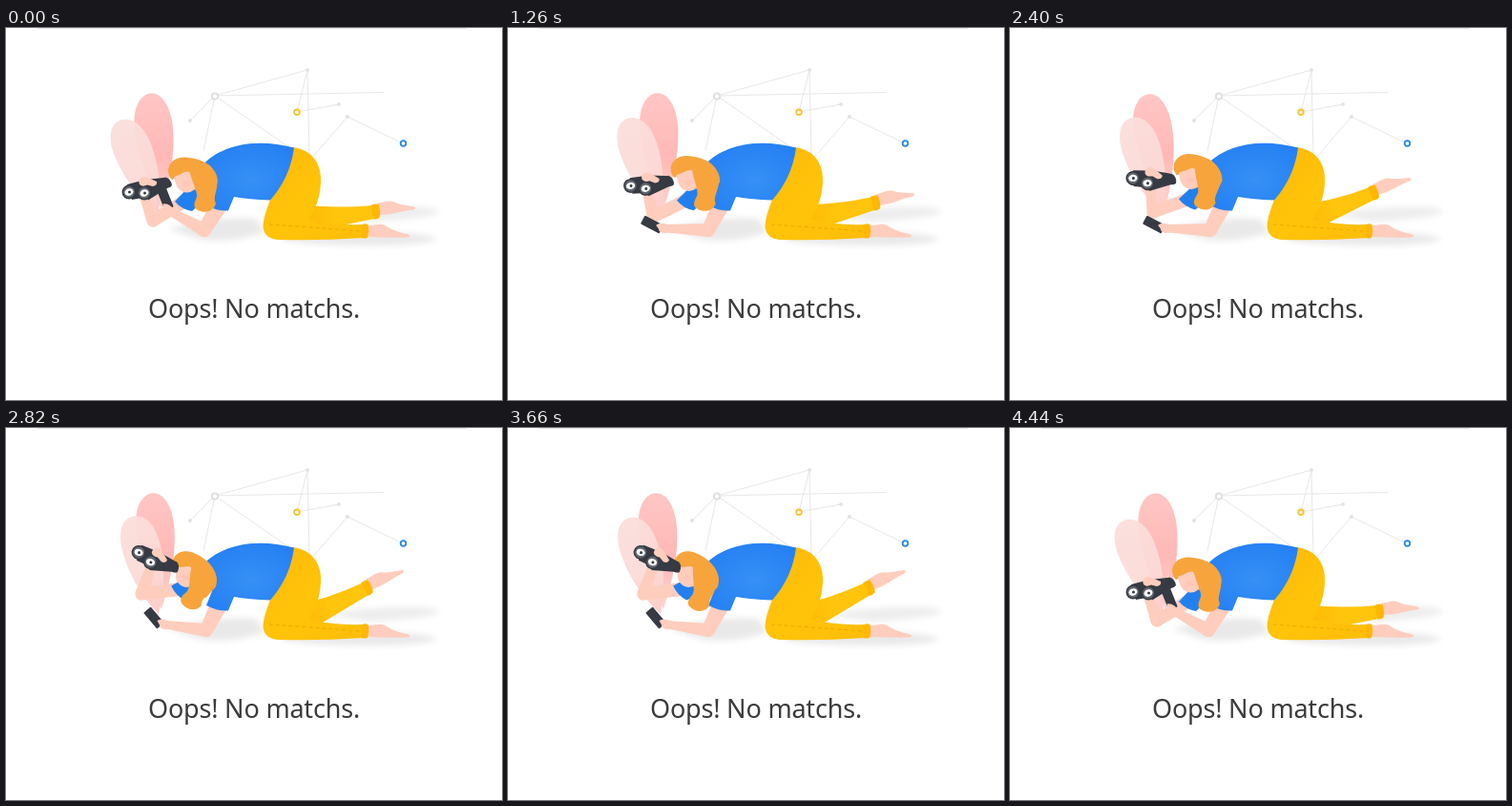
An HTML page that plays this animation: 520x390 px, repeating every 4.47 s.

```html
<!DOCTYPE html>
<html lang="en">
<head>
<meta charset="utf-8">
<title>No results</title>
<style>
html, body { margin: 0; width: 100%; height: 100%; overflow: hidden; background: #fff; }
svg { display: block; width: 520px; height: 390px; }
.net { fill: none; stroke: #e7e7e7; stroke-width: 1; }
.skin { fill: #fecdbd; }
.dark { fill: #363a43; }
.hair { fill: #f7a43c; }
text { font: 500 27px "Noto Sans", "Open Sans", sans-serif; font-stretch: 87.5%; letter-spacing: -.2px; fill: #3b3b3d; }
</style>
</head>
<body>
<svg viewBox="0 0 520 390">
  <defs>
    <linearGradient id="leafA" x1="0" y1="0" x2="0" y2="1">
      <stop offset="0" stop-color="#ffc6c4"/><stop offset=".55" stop-color="#ffb8b6"/><stop offset="1" stop-color="#ffd3cf"/>
    </linearGradient>
    <linearGradient id="leafB" x1="0" y1="0" x2="0" y2="1">
      <stop offset="0" stop-color="#fbdedb"/><stop offset=".6" stop-color="#fbdad6"/><stop offset="1" stop-color="#fcc9c4"/>
    </linearGradient>
    <radialGradient id="blue" cx=".55" cy=".55" r=".6">
      <stop offset="0" stop-color="#3690f5"/><stop offset="1" stop-color="#2580f3"/>
    </radialGradient>
    <linearGradient id="gold" x1="0" y1="0" x2="1" y2="1">
      <stop offset="0" stop-color="#ffb80a"/><stop offset=".5" stop-color="#ffc409"/><stop offset="1" stop-color="#ffbd08"/>
    </linearGradient>
    <linearGradient id="goldFar" x1="0" y1="0" x2="1" y2="0">
      <stop offset="0" stop-color="#ffb404"/><stop offset=".5" stop-color="#ffc40c"/>
    </linearGradient>
    <filter id="soft" x="-30%" y="-60%" width="160%" height="220%"><feGaussianBlur stdDeviation="3"/></filter>
  </defs>

  <path d="M33 .5H482" stroke="#e4e4e4"/>
  <path class="net" d="M193 97L219 71L316 44L305 88L349 80M219 71L396 67.500M219 71L207 129M219 71L298 126M316 44L318 134M416 121L358 93L320 137"/>
  <g fill="#e3e3e3">
    <circle cx="193" cy="97" r="2"/><circle cx="316" cy="44" r="2"/>
    <circle cx="349" cy="80" r="2"/><circle cx="358" cy="93" r="2"/>
  </g>
  <g fill="#fff" stroke-width="1.800">
    <circle cx="219" cy="71.500" r="3.200" stroke="#dedede"/>
    <circle cx="305" cy="88.300" r="2.800" stroke="#f9c22e"/>
    <circle cx="416.500" cy="121" r="2.800" stroke="#2488ee"/>
  </g>

  <g filter="url(#soft)" fill="#e9e9e9">
    <path d="M325 194L400 188Q450 186 455 193Q440 200 380 203Z" opacity=".8"/>
    <path d="M290 218L400 214Q448 216 452 222Q430 229 370 228Q310 227 290 222Z"/>
    <path d="M170 211Q215 196 262 200L272 214Q235 226 205 222Z"/>
  </g>

  <path id="pink" fill="url(#leafA)" d="M0 0C-12 -28 -20 -60 -20 -88C-20 -110 -10 -122 0 -122C11 -122 20 -108 20 -84C20 -55 10 -25 0 0Z"/>
  <path id="pale" fill="url(#leafB)" fill-opacity=".94" d="M0 0C-14 -24 -20 -52 -20 -73C-20 -94 -12 -106 -1 -106C11 -106 20 -94 20 -72C20 -48 12 -22 0 0Z"/>

  <path id="farUpper" class="skin"/>
  <path id="farLower" class="skin"/>
  <path id="farSleeve" fill="#2280ee" d="M4 -15L-11 1Q-4 9 7 11L24 -4Z"/>

  <g id="farLeg">
    <path class="skin" d="M389 183.500C394 184 399 180.500 406 182C413 185.500 421 186 428 187.500Q431 189.500 426 190.800C415 191.500 407 196 390 196Z"/>
    <path fill="url(#goldFar)" d="M300 184Q345 190 384 186L386 200Q352 207 312 215Z"/>
    <path fill="#ffb700" d="M383 185.500Q388 184 390.500 185Q393 192 391.500 199Q388 201 385 200.500Z"/>
  </g>

  <path class="skin" d="M378 206.500C384 208 391 204 397 206.500C404 212 413 214.500 421 216Q426 219 420 219.500C405 220 393 219.500 378 219Z"/>
  <path fill="url(#gold)" d="M301 125C322 128 331 143 330 162C329 180 324 190 317 201Q345 207 374 206L375 220Q330 223 287 222C273 222 268 213 270 203C272 192 275 186 277 180Z"/>
  <path d="M276 206Q320 209 372 213" fill="none" stroke="#e9a602" stroke-width=".9" stroke-dasharray="4 3"/>
  <path fill="#ffb700" d="M373 206Q377 204.500 379.500 206Q381 213 379 220Q376 221 373 220Z"/>

  <path id="nearUpper" class="skin"/>
  <path fill="url(#blue)" d="M203 148C218 126 256 113 302 125.500C299 149 289 167 277 180.500Q258 180 239 177L233 191.500Q221 192 210 186L216 171Z"/>

  <g id="head">
    <path class="hair" d="M170 149C171 139 181 134 191 136C207 137 222 147 222 161L216 176L198 170L190 152L174 159Q170 155 170 149Z"/>
    <path class="skin" d="M176 156Q182 154 187 151Q193 149 196 154Q201 161 198 169Q191 175 184 171Q178 168 176 156Z"/>
    <ellipse cx="189" cy="163" rx="4" ry="3" fill="#ffbcae" opacity=".4"/>
  </g>
  <path id="lock" class="hair" d="M-16 -6C-8 -16 11 -10 14 8C16 20 9 27 13 34C11 42 2 45 -6 41C-12 38 -9 32 -7 27C-6 20 -13 11 -16 -6Z"/>

  <g id="scope">
    <path class="dark" d="M127 164L146 159L165 157L171 164L154 176L132 180Z"/>
    <path class="dark" d="M143 165L167 156.500Q173 158 174 165Q173 167 169 168L149 180.500Z"/>
    <g id="lens">
      <circle class="dark" cx="129" cy="172" r="7.500"/>
      <circle cx="129" cy="172" r="6" fill="#62666e"/>
      <ellipse cx="129" cy="172" rx="4.600" ry="3.600" fill="#fff" transform="rotate(-20 129 172)"/>
      <circle class="dark" cx="129.500" cy="172" r="1.500"/>
    </g>
    <use href="#lens" x="16" y="1"/>
    <path class="skin" d="M139 160Q143 154 149 157L158 161Q159 165 154 166L148 164.500Q143 167 140 164Z"/>
  </g>

  <rect id="phone" class="dark" x="-11" y="-5" width="22" height="10" rx="1"/>
  <path id="nearLower" class="skin"/>
  <path id="fingers" class="skin" d="M-8 -3Q-5 -6 0 -5L6 -4L6 4L0 5Q-5 4 -5 1Z"/>

  <text x="260" y="303.500" text-anchor="middle">Oops! No matchs.</text>
</svg>
<script>
const LOOP = 4470;
const $ = id => document.getElementById(id);

// Pose values: rest, level, raised; each track eases between [time, ...values].
const hold = (a, b, c) => [[0, ...a], [960, ...a], [1600, ...b], [2400, ...b], [2800, ...c], [3700, ...c], [4440, ...a]];
const reach = (a, b, c) => [[0, ...a], [800, ...b], [2400, ...b], [2800, ...c], [3700, ...c], [4440, ...a]];

const tracks = {
  pink: [[0, -5.4], [950, -2.4], [2350, -8.8], [2950, -3.8], [3700, -4], [LOOP, -5.4]],
  pale: [[0, -22], [950, -16.8], [1800, -22.8], [2900, -14.5], [LOOP, -22]],
  leg: hold([0], [-15.3], [-19.5]),
  head: hold([0, 0, 0], [5, 1, -2], [20, 1, 0]),
  lock: [[0, 0], [800, -1], [1600, 8], [2400, 9], [2820, 26], [3660, 16], [4380, 0], [LOOP, 0]],
  scope: hold([0, 0, 0], [15.5, 1, -3], [36, 8, -15]),
  farArm: hold([188, 181, 154, 202, 145, 176], [188, 179, 150, 193, 147, 165], [182, 169, 142, 174, 154, 140]),
  nearArm: reach([208, 212, 170, 191], [210, 212, 163, 210], [210, 212, 166, 206]),
  phone: reach([167, 179, 68], [151, 206, 28], [155, 199, 50]),
  sleeve: hold([188, 181, 0], [188, 179, 4], [184, 168, 18])
};

function at(keys, t) {
  let i = 1;
  while (i < keys.length - 1 && keys[i][0] < t) i++;
  const [a, b] = [keys[i - 1], keys[i]];
  const k = Math.min(1, Math.max(0, (t - a[0]) / (b[0] - a[0])));
  const e = k * k * (3 - 2 * k);
  return a.slice(1).map((v, n) => v + (b[n + 1] - v) * e);
}

// Tapered limb with round ends.
function limb(id, x1, y1, r1, x2, y2, r2) {
  const len = Math.hypot(x2 - x1, y2 - y1);
  const nx = (y1 - y2) / len, ny = (x2 - x1) / len;
  $(id).setAttribute("d",
    `M${x1 + nx * r1} ${y1 + ny * r1}L${x2 + nx * r2} ${y2 + ny * r2}` +
    `A${r2} ${r2} 0 0 0 ${x2 - nx * r2} ${y2 - ny * r2}` +
    `L${x1 - nx * r1} ${y1 - ny * r1}A${r1} ${r1} 0 0 0 ${x1 + nx * r1} ${y1 + ny * r1}Z`);
}

const place = (id, x, y, r) => $(id).setAttribute("transform", `translate(${x} ${y}) rotate(${r})`);
const pivot = (id, cx, cy, [r, dx = 0, dy = 0]) =>
  $(id).setAttribute("transform", `translate(${dx} ${dy}) rotate(${r} ${cx} ${cy})`);

function draw(t) {
  const p = {};
  for (const name in tracks) p[name] = at(tracks[name], t);

  place("pink", 163, 190, p.pink[0]);
  place("pale", 160, 195, p.pale[0]);
  pivot("farLeg", 310, 205, p.leg);
  pivot("head", 205, 155, p.head);
  pivot("scope", 171, 162, p.scope);
  place("lock", 207 + p.head[1], 150 + p.head[2], p.lock[0]);
  place("farSleeve", ...p.sleeve);
  place("phone", ...p.phone);

  const [sx, sy, ex, ey, hx, hy] = p.farArm;
  limb("farUpper", sx, sy, 7, ex, ey, 6.5);
  limb("farLower", ex, ey, 6.5, hx, hy, 5);

  const [nx, ny, gx, gy] = p.nearArm;
  limb("nearUpper", 223, 186, 9, nx, ny, 7);
  limb("nearLower", nx, ny, 7, gx, gy, 4);
  place("fingers", gx, gy, Math.atan2(ny - gy, nx - gx) * 180 / Math.PI);
}

function frame() {
  draw(performance.now() % LOOP);
  requestAnimationFrame(frame);
}
frame();
</script>
</body>
</html>
```
